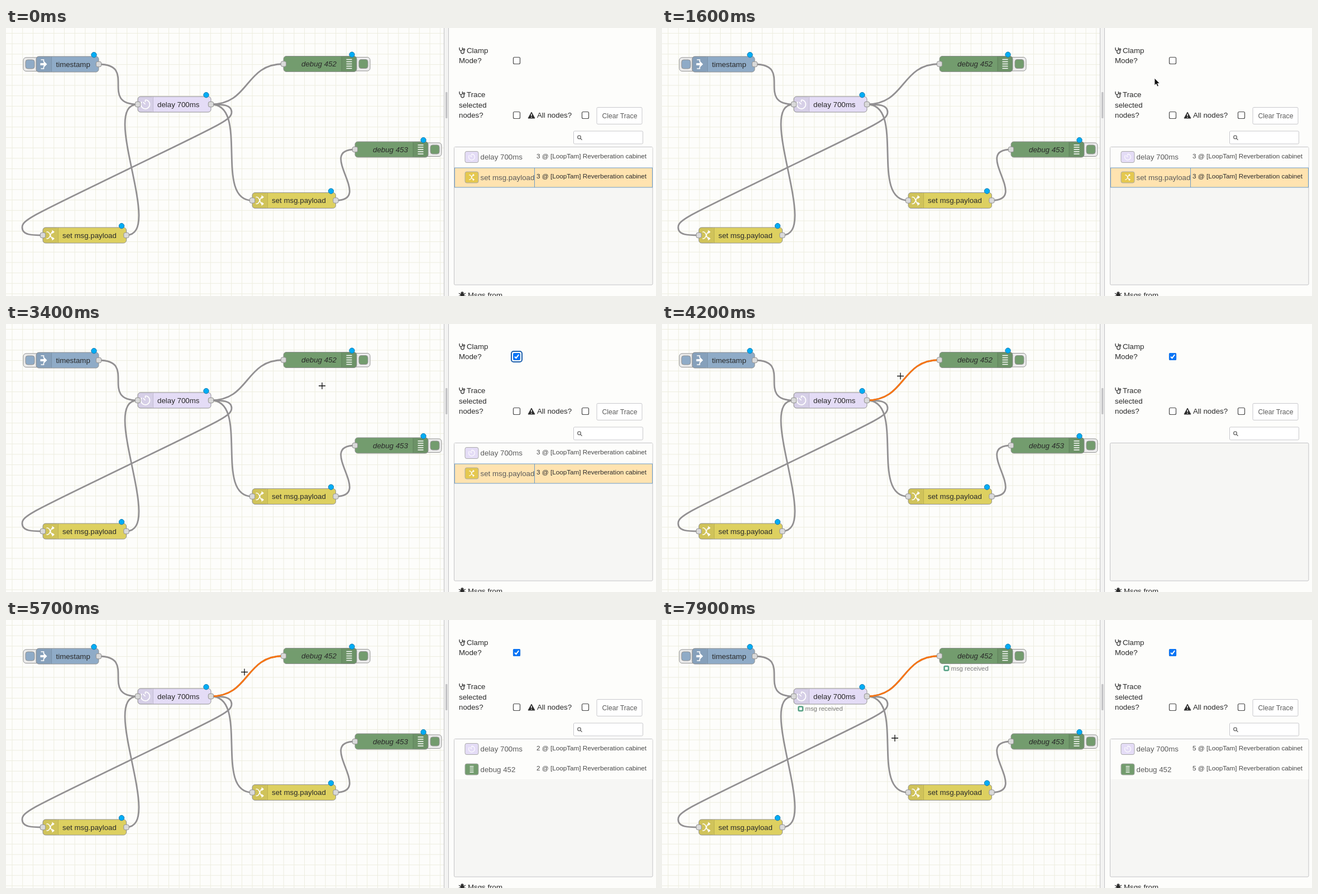
Recreate the animation shown at these times as an HTML page. Size 1164 by 481 pixels, loop 8 s.

```html
<!DOCTYPE html>
<html lang="en">
<head>
<meta charset="utf-8">
<style>
html, body { margin: 0; width: 100%; height: 100%; overflow: hidden; background: #fff; }
svg { display: block; width: 1164px; height: 481px; font: 13.3px "Liberation Sans", Arial, sans-serif; fill: #2a2a2a; }
.wire { fill: none; stroke: #929092; stroke-width: 2.8; }
.port { fill: #d9d9d9; stroke: #929292; }
.dot { fill: #00adf5; stroke: #1478ad; }
.icon { fill: none; stroke: #fff; stroke-width: 1.7; }
.glyph { fill: none; stroke: #333; stroke-width: 1.3; }
.box { fill: #fff; stroke: #484848; stroke-width: 1.2; }
.name { fill: #5c5c5c; }
.where { font-size: 11.7px; fill: #484848; }
.status { font-size: 11.3px; fill: #7c7c7c; }

/* one shared 8 s clock */
.hot, .checked, .focus, .old, .live, .cursor, .arrow, .cross, .tick, .flash { animation: 8s infinite step-end; }
.hot, .checked, .focus, .live, .tick, .flash { opacity: 0; }
.hot { animation-name: hot; stroke: #f87512; }
.checked { animation-name: checked; }
.focus { animation-name: focus; }
.old { animation-name: old; }
.live { animation-name: live; }
.tick { animation-name: tick; animation-delay: var(--at); }
.flash { animation-name: flash; animation-delay: var(--at); }
.cursor { animation-name: move; animation-timing-function: ease-in-out; }
.arrow { animation-name: arrow; }
.cross { animation-name: cross; }
@keyframes hot { 0% { opacity: 0 } 50.6% { opacity: 1 } }
@keyframes checked { 0% { opacity: 0 } 28.75% { opacity: 1 } }
@keyframes focus { 0% { opacity: 0 } 28.75% { opacity: 1 } 50.6% { opacity: 0 } }
@keyframes old { 0% { opacity: 1 } 50.6% { opacity: 0 } }
@keyframes live { 0% { opacity: 0 } 58.75% { opacity: 1 } }
@keyframes tick { 0% { opacity: 1 } 9.375% { opacity: 0 } }
@keyframes flash { 0% { opacity: 1 } 2.9% { opacity: 0 } }
@keyframes arrow { 0% { opacity: 0 } 16.9% { opacity: 1 } 36.5% { opacity: 0 } }
@keyframes cross { 0% { opacity: 0 } 36.5% { opacity: 1 } }
@keyframes move {
  0%, 16.9% { transform: translate(868px, 250px) }
  20%, 21% { transform: translate(882px, 90px) }
  26.2%, 33.1% { transform: translate(912px, 58px) }
  41.2%, 45% { transform: translate(566px, 111px) }
  49.4%, 81.3% { transform: translate(427px, 93.5px) }
  88.8%, 100% { transform: translate(417px, 212px) }
}
</style>
</head>
<body>
<svg viewBox="0 0 1164 481">
  <defs>
    <pattern id="grid" x="10.5" y="9" width="18.7" height="18.7" patternUnits="userSpaceOnUse">
      <path d="M.5 0V18.7M0 .5H18.7" stroke="#ededdf" fill="none"/>
    </pattern>
    <g id="inject" class="icon"><path d="M-5-8H0V-4M-5 8H0V4" stroke-width="1.6"/><path d="M-6-2H0V-6L6 0L0 6V2H-6Z" fill="#fff" stroke="none"/></g>
    <g id="delay" class="icon"><path d="M0-8A8 8 0 1 1-6.5-4.7M0-8V-4M0 0L-4-4"/></g>
    <g id="change" class="icon"><path d="M-7-6H-5C0-6 0 6 4 6H6M-7 6H-5C0 6 0-6 4-6H6"/><path d="M3-9.500L7.500-6L3-2.500ZM3 2.500L7.500 6L3 9.500Z" fill="#fff" stroke="none"/></g>
    <g id="debug" class="icon"><path d="M-5-8H5M-5-4H5M-5 0H5M-5 4H5M-5 8H5"/></g>
    <g id="scope" class="glyph"><path d="M-4-5V-2A2.6 2.6 0 0 0 1.4-2V-5M-1.3 1V3A2.8 2.8 0 0 0 4.3 3V0"/><circle cx="4.2" cy="-1.5" r="1.4"/></g>
  </defs>

  <rect width="785" height="481" fill="#fdfdfb"/>
  <rect width="785" height="481" fill="url(#grid)"/>
  <g id="wires"></g>
  <g id="nodes"></g>

  <rect x="785" width="379" height="481" fill="#fdfdfb"/>
  <rect x="784.5" y="-1" width="8" height="483" fill="#f3f3f2" stroke="#c2c2c4"/>
  <rect x="787" y="115" width="3.5" height="47" rx="1" fill="#c4c4c6"/>

  <use href="#scope" x="816" y="40"/>
  <text x="825" y="45">Clamp</text><text x="811" y="63">Mode?</text>
  <use href="#scope" x="816" y="119"/>
  <text x="825" y="124">Trace</text><text x="811" y="143">selected</text><text x="811" y="161">nodes?</text>
  <path d="M941 151L947 162H935Z" stroke="#333" stroke-linejoin="round"/>
  <path d="M941 154V158M941 159.5V161" stroke="#fff" stroke-width="1.5"/>
  <text x="951" y="161">All nodes?</text>
  <rect class="box" x="908.5" y="52.5" width="12" height="12" rx="2"/>
  <rect class="box" x="908.5" y="150.5" width="12" height="12" rx="2"/>
  <rect class="box" x="1031.5" y="150.5" width="12" height="12" rx="2"/>
  <rect class="focus" x="905" y="49" width="19" height="19" rx="4" fill="#fff" stroke="#1b5fad" stroke-width="2"/>
  <g class="checked"><rect x="908" y="52" width="13" height="13" rx="2" fill="#0c75f5"/><path d="M911 58.7L913.5 61.2L918.2 55" fill="none" stroke="#fff" stroke-width="2"/></g>
  <rect x="1058" y="142.5" width="81" height="30" rx="2" fill="#fff" stroke="#c8c8cc"/>
  <text x="1067.5" y="162" font-size="12.2" class="name">Clear Trace</text>
  <rect x="1016.5" y="185" width="124" height="23" rx="2" fill="#fff" stroke="#c8c8cc"/>
  <g class="glyph" opacity=".75"><circle cx="1026.5" cy="196" r="2.8"/><path d="M1028.500 198L1031.500 201"/></g>

  <rect x="802.5" y="213.5" width="355.500" height="247.500" rx="2" fill="#f6f6f4" stroke="#c3c3c6"/>
  <g class="old" id="old">
    <rect x="803" y="214" width="354.5" height="72" fill="#fdfdfb"/>
    <rect x="803.5" y="251" width="354" height="35" fill="#ffe3b0" stroke="#6c9cc6"/>
    <path d="M946.5 251V286" stroke="#6c9cc6"/>
  </g>
  <g class="live" id="live"><rect x="803" y="214" width="354.5" height="72" fill="#fdfdfb"/></g>

  <ellipse cx="817" cy="480" rx="3.5" ry="5"/>
  <path class="glyph" d="M811 476L814 478M823 476L820 478M811 481H823M815 476A2 2 0 0 1 819 476"/>
  <text x="827" y="483.5">Msgs from</text>

  <g class="cursor">
    <path class="arrow" d="M0 0V13L3 10.3L5 15L7.3 14L5.3 9.5H9.3Z" fill="#111" stroke="#fff" stroke-width=".8"/>
    <path class="cross" d="M-6 0H6M0-6V6" stroke="#111" stroke-width="1.3"/>
  </g>
</svg>
<script>
const BLUE = '#8fabc7', GREEN = '#739c6e', YELLOW = '#ddd060', LILAC = '#e4dcf6';
const FIRST = 4700, PERIOD = 750, COUNT = 5;
const add = (id, markup) => document.getElementById(id).insertAdjacentHTML('beforeend', markup);
const rect = (x, y, w, h, rx, attrs) => `<rect x="${x}" y="${y}" width="${w}" height="${h}" rx="${rx}" ${attrs}/>`;
const beats = draw => Array.from({ length: COUNT }, (_, i) => draw(i + 1, `style="--at:${FIRST + i * PERIOD}ms"`)).join('');

// Forward wire: horizontal handles 70px long at both ends
function wire(x1, y1, x2, y2, cls = '') {
  add('wires', `<path class="wire ${cls}" d="M${x1} ${y1}C${x1 + 70} ${y1} ${x2 - 70} ${y2} ${x2} ${y2}"/>`);
}

// y is the vertical centre of the node
function node(x, y, w, color, icon, label, tx, ports) {
  const right = icon === 'debug', edge = 'stroke="#929292"';
  const ix = right ? x + w - 27 : x;
  let s = '';
  if (right || icon === 'inject') {
    const bx = right ? x + w - 6 : x - 23;
    s += rect(bx, y - 12, 30, 24.5, 5, `fill="#ececec" ${edge}`)
       + rect(right ? x + w + 4 : x - 19, y - 8, 16, 16, 4, `fill="${color}" ${edge}`);
  }
  s += rect(x, y - 14, w, 28, 5, `fill="${color}" ${edge}`)
     + rect(ix, y - 14, 27, 28, 4, 'fill="#000" fill-opacity=".06"')
     + `<path d="M${right ? ix : ix + 27.5} ${y - 13.5}v27" stroke="#000" stroke-opacity=".15"/>`
     + `<use href="#${icon}" x="${ix + 13.5}" y="${y}"/>`
     + `<text x="${tx}" y="${y + 4.7}"${right ? ' font-style="italic"' : ''}>${label}</text>`;
  if (ports.includes('i')) s += rect(x - 4.7, y - 4.7, 9.4, 9.4, 2.8, 'class="port"');
  if (ports.includes('o')) s += rect(x + w - 4.7, y - 4.7, 9.4, 9.4, 2.8, 'class="port"');
  s += `<circle class="dot" cx="${x + w - 8.5}" cy="${y - 16.8}" r="4.7"/>`;
  add('nodes', s);
}

function status(x, y) {
  add('nodes', beats((n, at) => `<g class="flash" ${at}>`
    + rect(x + 1.5, y - 3.5, 7.5, 7.5, 1.5, 'fill="#fff" stroke="#55a184" stroke-width="2.5"')
    + `<text class="status" x="${x + 13.5}" y="${y + 4}">msg received</text></g>`));
}

function row(id, y, color, icon, label, counter, strong = '') {
  const ty = y ? 270 : 234;
  add(id, rect(822, y ? 258 : 221.5, 24, 20, 3, `fill="${color}" stroke="#aaa"`)
    + `<use href="#${icon}" transform="translate(834 ${y ? 268 : 231.5}) scale(.68)"/>`
    + `<text class="name" x="849.5" y="${y ? 272.5 : 236}">${label}</text>`
    + `<g class="where" ${strong}>${counter(ty)}<text x="959.8" y="${ty}">@ [LoopTam] Reverberation cabinet</text></g>`);
}

wire(166, 65, 236, 137);
wire(367, 137, 441, 309.5);
wire(590, 309.5, 625, 218);
wire(215, 372, 236, 137);
// backward wire, symmetric about its middle
add('wires', '<path class="wire" d="M367 137C386 137 404 137 404 151S386 172 216.5 254.5S29 344 29 358S47 372 66 372"/>');
wire(367, 137, 497, 64.5);
wire(367, 137, 497, 64.5, 'hot');

node(54, 65, 112, BLUE, 'inject', 'timestamp', 89.5, 'o');
node(236, 137, 131, LILAC, 'delay', 'delay 700ms', 271, 'io');
node(497, 64.5, 131, GREEN, 'debug', 'debug 452', 529, 'i');
node(625, 218, 131, GREEN, 'debug', 'debug 453', 657, 'i');
node(441, 309.5, 149.5, YELLOW, 'change', 'set msg.payload', 476, 'io');
node(66, 372, 149.5, YELLOW, 'change', 'set msg.payload', 101, 'io');
status(243, 159);
status(504, 86.5);

const fixed = y => `<text x="950" y="${y}">3</text>`;
const counting = y => beats((n, at) => `<text class="tick" ${at} x="950" y="${y}">${n}</text>`);
row('old', 0, LILAC, 'delay', 'delay 700ms', fixed);
row('old', 1, '#e5c84f', 'change', 'set msg.payload', fixed, 'style="fill:#2b2b2b"');
row('live', 0, LILAC, 'delay', 'delay 700ms', counting);
row('live', 1, GREEN, 'debug', 'debug 452', counting);
</script>
</body>
</html>
```
